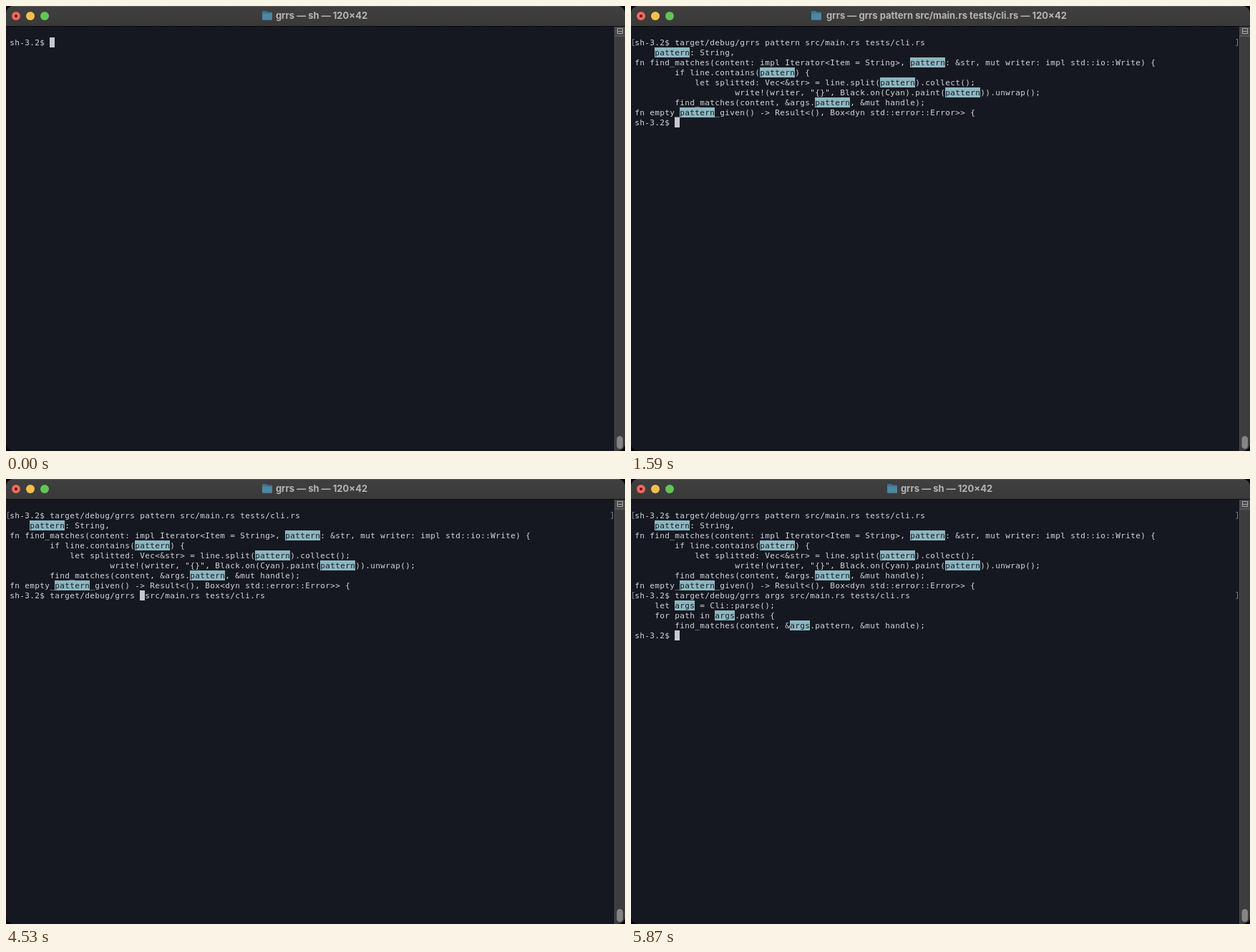
An HTML page with a canvas for the animation above (9.41 s loop, 865 by 623 pixels).

```html
<!DOCTYPE html>
<html lang="en">
<head>
<meta charset="utf-8">
<title>Terminal</title>
<style>
  html, body { margin: 0; width: 100%; height: 100%; overflow: hidden; background: #000; }
  canvas { display: block; }
</style>
</head>
<body>
<canvas id="screen" width="865" height="623"></canvas>
<script>
const ctx = document.getElementById('screen').getContext('2d');
const W = 865, H = 623, LOOP = 9410;
const CELL = 7, LINE = 14, LEFT = 5, TOP = 44;
const BG = '#161821', FG = '#d3d5da', CURSOR = '#c6c8d1', MARK = '#8db7c0';

const PROMPT = 'sh-3.2$ ';
const command = word => `target/debug/grrs ${word} src/main.rs tests/cli.rs`;

const patternOutput = [
  '    pattern: String,',
  'fn find_matches(content: impl Iterator<Item = String>, pattern: &str, mut writer: impl std::io::Write) {',
  '        if line.contains(pattern) {',
  '            let splitted: Vec<&str> = line.split(pattern).collect();',
  '                    write!(writer, "{}", Black.on(Cyan).paint(pattern)).unwrap();',
  '        find_matches(content, &args.pattern, &mut handle);',
  'fn empty_pattern_given() -> Result<(), Box<dyn std::error::Error>> {'
];
const argsOutput = [
  '    let args = Cli::parse();',
  '    for path in args.paths {',
  '        find_matches(content, &args.pattern, &mut handle);'
];

// Second command line: [start, text after the prompt, cursor column]
const edits = [
  [1590, '', 8],
  [2380, command('pattern'), 58],
  [2650, command('pattern'), 56],
  [2910, command('pattern'), 52],
  [3180, command('pattern'), 46],
  [3440, command('pattern'), 38],
  [3710, command('pattern'), 34],
  [4000, command('pattern'), 26],
  [4530, command(''), 26],
  [4790, command('a'), 27],
  [5060, command('ar'), 28],
  [5330, command('arg'), 29],
  [5600, command('args'), 30]
];

function rect(x, y, w, h, color) {
  ctx.fillStyle = color;
  ctx.fillRect(x, y, w, h);
}

function round(x, y, w, h, r, color) {
  ctx.fillStyle = color;
  ctx.beginPath();
  ctx.roundRect(x, y, w, h, r);
  ctx.fill();
}

function dot(x, y, r, color) {
  ctx.fillStyle = color;
  ctx.beginPath();
  ctx.arc(x, y, r, 0, Math.PI * 2);
  ctx.fill();
}

function folder(x, y) {
  round(x, y, 7, 4, 1, '#3f7391');
  round(x, y + 1.5, 14, 11, 1.2, '#3f7391');
  round(x, y + 3.5, 14, 9, 1.2, '#4d87a6');
}

function titleBar(busy) {
  const shade = ctx.createLinearGradient(0, 0, 0, 28);
  shade.addColorStop(0, '#404040');
  shade.addColorStop(1, '#393939');
  rect(0, 0, W, 28, shade);
  rect(0, 0, W, 1, '#555');
  rect(0, 28, W, 1, '#0a0a0c');

  ['#ed6a5e', '#f5bf4f', '#61c554'].forEach((c, i) => dot(14 + i * 20, 14, 6, c));
  dot(14, 14, 2, '#6e1410');

  folder(busy ? 252 : 358, 7);
  const job = busy ? 'grrs pattern src/main.rs tests/cli.rs' : 'sh';
  ctx.font = '700 13px Inter, sans-serif';
  ctx.textAlign = 'center';
  ctx.fillStyle = '#b5b5b5';
  ctx.fillText(`grrs — ${job} — 120×42`, 441, 18);
}

function scrollBar() {
  rect(850, 29, 15, H - 29, '#3d3d3d');
  rect(850, 29, 1, H - 29, '#4b4b4b');
  rect(850, 29, 15, 13, '#4a4a4a');
  rect(850, 42, 15, 1, '#5c5c5c');
  ctx.strokeStyle = '#a5a5a5';
  ctx.lineWidth = 1;
  ctx.strokeRect(854.5, 31.5, 7, 7);
  rect(855, 35, 6, 1, '#a5a5a5');
  round(853.5, 602, 8.5, 18, 4.25, '#858585');
}

function brackets(row) {
  const y = TOP + row * LINE + 2;
  ctx.strokeStyle = '#80828b';
  ctx.lineWidth = 1;
  ctx.beginPath();
  for (const [x, d] of [[2.5, 2], [847.5, -2]]) {
    ctx.moveTo(x + d, y + 0.5);
    ctx.lineTo(x, y + 0.5);
    ctx.lineTo(x, y + 9.5);
    ctx.lineTo(x + d, y + 9.5);
  }
  ctx.stroke();
}

function print(text, row, word) {
  const y = TOP + row * LINE;
  const marked = new Set();
  if (word) {
    for (let at = text.indexOf(word); at >= 0; at = text.indexOf(word, at + 1)) {
      rect(LEFT + at * CELL, y, word.length * CELL, LINE, MARK);
      for (let i = 0; i < word.length; i++) marked.add(at + i);
    }
  }
  ctx.font = '11px "DejaVu Sans Mono", monospace';
  ctx.textAlign = 'center';
  [...text].forEach((ch, col) => {
    ctx.fillStyle = marked.has(col) ? BG : FG;
    ctx.fillText(ch, LEFT + (col + 0.5) * CELL, y + 11);
  });
}

function cursor(col, row) {
  rect(LEFT + col * CELL, TOP + row * LINE, CELL, LINE, CURSOR);
}

function shell(t) {
  print(PROMPT + (t >= 1060 ? command('pattern') : ''), 0);
  if (t < 1320) return cursor(t < 1060 ? 8 : 58, 0);
  brackets(0);
  if (t < 1590) return cursor(0, 1);

  patternOutput.forEach((line, i) => print(line, i + 1, 'pattern'));
  const [, text, col] = edits.findLast(([start]) => t >= start);
  print(PROMPT + text, 8);
  if (t < 5870) return cursor(col, 8);

  brackets(8);
  argsOutput.forEach((line, i) => print(line, i + 9, 'args'));
  print(PROMPT, 12);
  cursor(8, 12);
}

function draw(now) {
  const t = now % LOOP;
  rect(0, 0, W, H, '#000');
  ctx.save();
  ctx.beginPath();
  ctx.roundRect(0, 0, W, H, 10);
  ctx.clip();
  rect(0, 0, W, H, BG);
  titleBar(t >= 1590 && t < 1850);
  scrollBar();
  shell(t);
  ctx.restore();
}

const begin = performance.now();
function tick() {
  draw(performance.now() - begin);
  requestAnimationFrame(tick);
}
tick();
</script>
</body>
</html>
```
